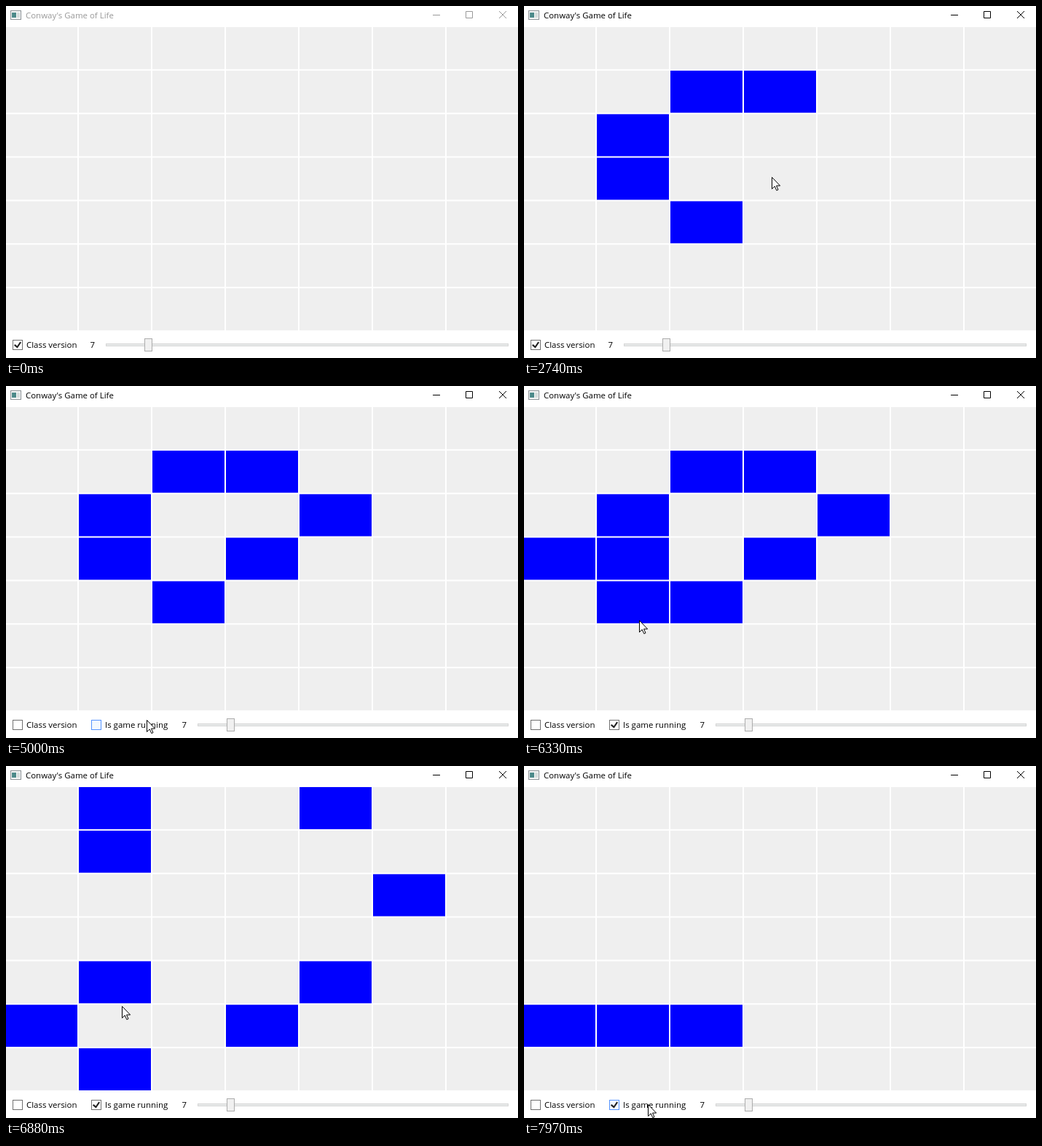
An HTML page for the animation above (8000 ms loop, 703x484 px).

```html
<!DOCTYPE html>
<html lang="en">
<head>
<meta charset="utf-8">
<title>Conway's Game of Life</title>
<style>
  html, body { margin: 0; width: 100%; height: 100%; overflow: hidden; background: #fff; }
  svg { display: block; width: 100vw; height: 100vh; }
  text { font: 11.45px "Open Sans", "Noto Sans", sans-serif; }
  .crisp { shape-rendering: crispEdges; }
  .line { fill: none; stroke: currentColor; }
  .box { fill: #fff; stroke: #707070; }
  .hover .box { fill: #f3f9ff; stroke: #5593ff; }
  .tick { fill: #212121; }
</style>
</head>
<body>
<svg viewBox="0 0 703 484">
  <defs>
    <path id="tick" d="M10 1.2L4.7 9.1H4.5L0 5.2L1.3 3.5L4.3 6.1L8.3 0Z"/>
  </defs>
  <rect width="703" height="484" fill="#fff"/>

  <g class="crisp">
    <rect x="6.5" y="6.5" width="14" height="12" fill="#f4f6f6" stroke="#8b9196"/>
    <rect x="8" y="9" width="6" height="7" fill="#4c8a8a"/>
    <rect x="15" y="9" width="4" height="7" fill="#d5dcdc"/>
  </g>
  <g id="bar">
    <text x="27" y="17" fill="currentColor">Conway's Game of Life</text>
    <g class="line">
      <path d="M586 12.5H596M631.5 7.5H640.5V16.5H631.5Z"/>
      <path d="M677 7L687 17M687 7L677 17"/>
    </g>
  </g>

  <g id="grid" fill="#efefef"></g>

  <g id="version">
    <rect class="box" x="9.5" y="459.5" width="13" height="13"/>
    <use class="tick" href="#tick" x="11" y="461.5"/>
    <text x="28" y="470">Class version</text>
  </g>
  <g id="running">
    <rect class="box" x="117.5" y="459.5" width="13" height="13"/>
    <use class="tick" href="#tick" x="119" y="461.5"/>
    <text x="136" y="470">Is game running</text>
  </g>
  <text id="size" y="470">7</text>
  <rect id="track" y="464.5" height="3" fill="#e7eaea" stroke="#d6d6d6"/>
  <rect id="thumb" y="457.5" width="10" height="17" fill="#f0f0f0" stroke="#acacac"/>

  <path id="cursor" fill="#fff" stroke="#000" d="M.5 .5V16.5L4.2 12.9L6.8 18.6L9 17.6L6.5 12.1H11.6Z"/>
</svg>
<script>
const LOOP = 8000, CAPTURE = 78.3, TURN = 100.5, REST = 110;
const SIZE = 7, COL = 101, ROW = 419 / SIZE, LEFT = -2, TOP = 28;
const $ = id => document.getElementById(id);

const move = (t, x, y) => ({ t, x, y, rest: 0 });
const click = (t, x, y) => ({ t, x, y, rest: REST });

// Pointer stops; it rests around each click
const stops = [
  move(70, 40, 120), click(390, 142, 178), click(780, 155, 219),
  click(1560, 250, 112), click(1880, 325, 134), click(2450, 254, 296),
  click(2820, 340, 235), click(3200, 440, 185), move(3602, 199, 378),
  move(3780, 222, 430), move(4100, 100, 465), click(4540, 72, 465),
  move(4850, 196, 465), move(5170, 190, 453), click(5470, 176, 467),
  move(5720, 299, 395), click(6180, 158, 321), move(6890, 159, 330),
  move(7360, 199, 376), move(7987, 170, 465)
];

function pointerAt(t) {
  const next = stops.findIndex(s => s.t > t);
  if (next === 0) return stops[0];
  if (next < 0) return stops[stops.length - 1];
  const a = stops[next - 1], b = stops[next];
  const start = a.t + a.rest, end = b.t - b.rest;
  const k = Math.min(1, Math.max(0, (t - start) / (end - start)));
  const mix = (p, q) => Math.round(p + (q - p) * k);
  return { x: mix(a.x, b.x), y: mix(a.y, b.y) };
}

const inLabel = ({ x, y }, x0, x1) => y > 456 && y < 475 && x >= x0 && x <= x1;
const onVersion = p => inLabel(p, 9, 97);
const onRunning = p => inLabel(p, 117, 222);

function nextGeneration(live) {
  return live.map((alive, i) => {
    const r = Math.floor(i / SIZE), c = i % SIZE;
    const n = live.filter((on, j) => on && j !== i &&
      Math.abs(Math.floor(j / SIZE) - r) < 2 && Math.abs(j % SIZE - c) < 2).length;
    return n === 3 || (alive && n === 2);
  });
}

function press(state, p) {
  const next = { ...state, active: true };
  if (onVersion(p)) next.version = !state.version;
  else if (onRunning(p)) next.running = !state.running;
  else {
    const cell = Math.floor((p.y - TOP) / ROW) * SIZE + Math.floor((p.x - LEFT) / COL);
    next.live = state.live.map((on, i) => on !== (i === cell));
  }
  return next;
}

// Play all clicks and generations once, keeping each state
const states = [{
  at: 0, active: false, version: true, running: false, live: Array(SIZE * SIZE).fill(false)
}];
const events = stops.filter(s => s.rest);
for (let t = 5554.5; t < LOOP; t += TURN) events.push({ t });
events.sort((a, b) => a.t - b.t);
for (const e of events) {
  const state = states[states.length - 1];
  const next = e.rest ? press(state, e) : { ...state, live: nextGeneration(state.live) };
  states.push({ ...next, at: e.t });
}

const cells = states[0].live.map((_, i) => {
  const rect = document.createElementNS("http://www.w3.org/2000/svg", "rect");
  rect.setAttribute("x", LEFT + 1 + COL * (i % SIZE));
  rect.setAttribute("y", TOP + 1 + ROW * Math.floor(i / SIZE));
  rect.setAttribute("width", COL - 2);
  rect.setAttribute("height", ROW - 2);
  return $("grid").appendChild(rect);
});

const show = (el, on) => el.setAttribute("visibility", on ? "inherit" : "hidden");
const tickOf = id => $(id).querySelector("use");

function draw(time) {
  const t = Math.floor(time / CAPTURE + 0.3) * CAPTURE;
  const state = states.filter(s => s.at <= t).pop();
  const pointer = pointerAt(t), visible = t > 0;

  $("bar").style.color = state.active ? "#000" : "#999";
  cells.forEach((cell, i) => cell.setAttribute("fill", state.live[i] ? "#00f" : "#efefef"));

  show($("cursor"), visible);
  $("cursor").setAttribute("transform", `translate(${pointer.x} ${pointer.y})`);
  $("version").classList.toggle("hover", visible && onVersion(pointer));
  $("running").classList.toggle("hover", visible && onRunning(pointer));

  show(tickOf("version"), state.version);
  show($("running"), !state.version);
  show(tickOf("running"), !state.version && state.running);

  const left = state.version ? 137.5 : 263.5;
  $("size").setAttribute("x", left - 22);
  $("track").setAttribute("x", left);
  $("track").setAttribute("width", 689.5 - left);
  $("thumb").setAttribute("x", state.version ? 190.5 : 303.5);
}

function frame() {
  draw(performance.now() % LOOP);
  requestAnimationFrame(frame);
}
frame();
</script>
</body>
</html>
```
